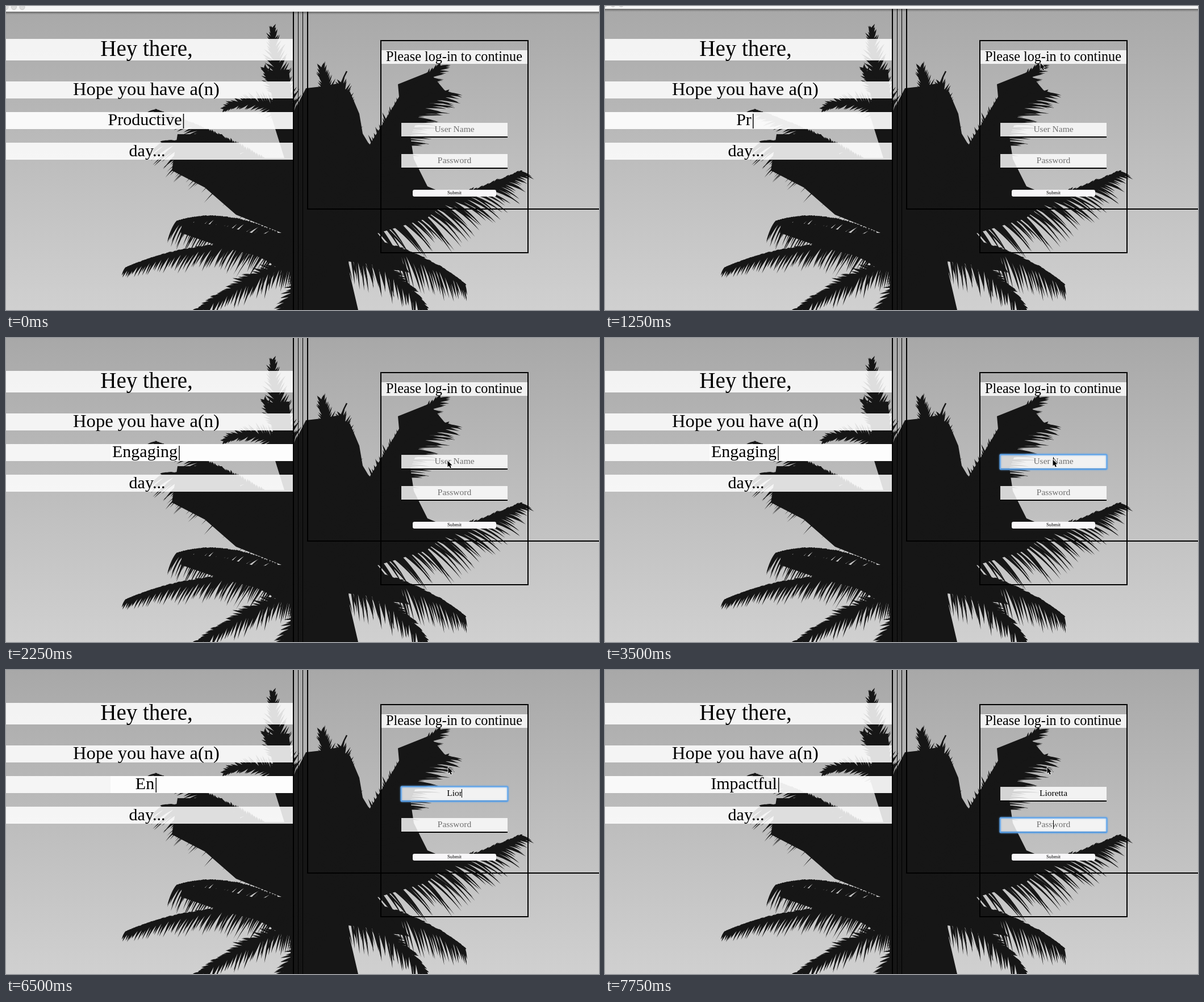
An HTML page with a canvas for the animation above (8000 ms loop, 1044 px wide and 536 px high).

```html
<!DOCTYPE html>
<html lang="en">
<head>
<meta charset="utf-8">
<title>Log-in page</title>
<style>
  html, body { margin: 0; width: 100%; height: 100%; overflow: hidden; background: #bbb; }
  canvas { display: block; }
</style>
</head>
<body>
<canvas id="stage" width="1044" height="536"></canvas>
<script>
const W = 1044, H = 536, LOOP = 8000;
const INK = '#161616';
const ctx = document.getElementById('stage').getContext('2d');

// Each track is a list of [start time, value]; values hold until the next one.
const words = [
  [0, 'Productive'], [1000, 'Produc'], [1250, 'Pr'], [1500, 'En'], [1750, 'Enga'],
  [2000, 'Engaging'], [6250, 'Engag'], [6500, 'En'], [6750, 'I'], [7000, 'Impac'], [7250, 'Impactful']
];
const pointer = [
  [0, null], [1000, [770, 1]], [1250, [766, 100]], [1500, [762, 198]], [1750, [767, 214]],
  [2000, [774, 216]], [2250, [777, 216]], [3000, [784, 216]], [3250, [787, 215]],
  [3500, [788, 214]], [4500, [780, 181]], [4750, [778, 171]]
];
const user = 'Lioretta';
const typed = [[0, 0], [5500, 1], [6000, 2], [6250, 3], [6500, 4], [6750, 5], [7000, 6], [7250, 8]];
const barTop = [[0, 0], [1250, -5], [1500, -20]];
const bright = [[0, W], [1750, 212], [2000, 184], [7500, W]];

function at(track, t) {
  let value = track[0][1];
  for (const [start, v] of track) if (t >= start) value = v;
  return value;
}

function seeded(seed) {
  return () => (seed = (seed * 16807) % 2147483647) / 2147483647;
}

// Spine start, bend, tip; leaflet length on each side; droop.
const fronds = [
  [500, 190, 472, 120, 469, 42, 32, 36, 0],
  [520, 215, 450, 150, 386, 180, 26, 30, 0],
  [515, 215, 480, 160, 456, 112, 26, 30, 0],
  [530, 340, 380, 235, 278, 240, 92, 22, .25],
  [500, 300, 380, 225, 265, 184, 45, 10, .1],
  [530, 430, 400, 350, 302, 380, 74, 10, .55],
  [530, 430, 350, 405, 212, 462, 42, 12, .3],
  [540, 440, 440, 470, 332, 540, 46, 28, .1],
  [570, 400, 585, 240, 556, 112, 38, 48, 0],
  [575, 380, 605, 230, 590, 138, 36, 46, 0],
  [600, 370, 665, 190, 762, 108, 32, 58, .1],
  [600, 370, 670, 190, 775, 152, 26, 84, .1],
  [590, 390, 770, 360, 905, 293, 24, 82, .25],
  [580, 400, 730, 430, 806, 490, 14, 58, .4],
  [580, 425, 680, 450, 740, 536, 24, 50, .2],
  [560, 430, 520, 490, 470, 560, 40, 34, 0]
];

const body = [
  505, 190, 528, 145, 555, 142, 582, 137, 606, 152, 622, 190, 628, 225, 640, 245,
  665, 205, 692, 160, 690, 138, 745, 116, 775, 152, 733, 180, 712, 230, 718, 270,
  742, 318, 785, 336, 740, 375, 650, 402, 690, 440, 710, 470, 640, 455, 600, 450,
  620, 536, 500, 536, 502, 470, 440, 440, 380, 425, 308, 400, 310, 380, 380, 387,
  440, 402, 485, 400, 405, 368, 350, 320, 292, 290, 302, 226, 380, 226, 415, 268,
  490, 268, 462, 178, 470, 165, 458, 115, 498, 112
];

function drawFrond(g, rnd, [x0, y0, cx, cy, x1, y1, lenA, lenB, droop]) {
  const n = Math.round(Math.hypot(x1 - x0, y1 - y0) / 4.5);
  g.lineWidth = 3;
  g.beginPath();
  g.moveTo(x0, y0);
  g.quadraticCurveTo(cx, cy, x1, y1);
  g.stroke();
  g.beginPath();
  for (let i = 1; i <= n; i++) {
    const t = i / n, u = 1 - t;
    const x = u * u * x0 + 2 * u * t * cx + t * t * x1;
    const y = u * u * y0 + 2 * u * t * cy + t * t * y1;
    const dir = Math.atan2(u * (cy - y0) + t * (y1 - cy), u * (cx - x0) + t * (x1 - cx));
    for (const side of [-1, 1]) {
      const len = (side < 0 ? lenA : lenB) * (1 - .65 * t ** 3) * (.7 + .4 * rnd());
      const a = dir + side * (1.05 - .55 * t + .25 * (rnd() - .5));
      const ex = x + len * Math.cos(a), ey = y + len * (Math.sin(a) + droop);
      const mx = x + .55 * len * Math.cos(a), my = y + .55 * len * Math.sin(a);
      const wx = -2.1 * Math.sin(a), wy = 2.1 * Math.cos(a);
      g.moveTo(x - wx, y - wy);
      g.quadraticCurveTo(mx - wx, my - wy, ex, ey);
      g.quadraticCurveTo(mx + wx, my + wy, x + wx, y + wy);
    }
  }
  g.fill();
}

function makeBackdrop() {
  const layer = document.createElement('canvas');
  layer.width = W;
  layer.height = H;
  const g = layer.getContext('2d');
  const sky = g.createLinearGradient(0, 0, 0, H);
  sky.addColorStop(0, '#a8a8a8');
  sky.addColorStop(.5, '#bdbdbd');
  sky.addColorStop(1, '#d0d0d0');
  g.fillStyle = sky;
  g.fillRect(0, 0, W, H);
  g.fillStyle = g.strokeStyle = INK;
  g.beginPath();
  for (let i = 0; i < body.length; i += 2) g.lineTo(body[i], body[i + 1]);
  g.fill();
  const rnd = seeded(4211);
  for (const f of fronds) drawFrond(g, rnd, f);
  // Bare stalk beside the middle frond.
  g.lineWidth = 2.5;
  g.beginPath();
  g.moveTo(588, 142);
  g.lineTo(595, 125);
  g.lineTo(600, 115);
  g.stroke();
  return layer;
}
const backdrop = makeBackdrop();

function rect(x, y, w, h, color) {
  ctx.fillStyle = color;
  ctx.fillRect(x, y, w, h);
}

function text(str, x, y, size, color = '#000') {
  ctx.font = `${size}px "Liberation Serif", serif`;
  ctx.textAlign = 'center';
  ctx.fillStyle = color;
  ctx.fillText(str, x, y);
}

function drawGreeting(t) {
  const veil = 'rgba(255,255,255,.86)';
  rect(0, 58, 505, 38, veil);
  for (const y of [133, 187, 241]) rect(0, y, 505, 30, veil);
  const x = at(bright, t);
  if (x < 505) rect(x, 187, 505 - x, 30, '#fdfdfd');
  else rect(0, 187, 505, 30, 'rgba(255,255,255,.4)');
  text('Hey there,', 247.5, 88, 39);
  text('Hope you have a(n)', 247, 157, 32.6);
  text(at(words, t) + '|', 247.5, 210, 30);
  text('day...', 248.5, 265, 30);
}

function drawLines() {
  rect(505, 0, 2, H, '#000');
  rect(514, 0, 1, H, '#000');
  rect(522, 0, 1, H, '#000');
  rect(530, 0, 2, 359, '#000');
  rect(530, 357, W - 530, 2, '#000');
  ctx.strokeStyle = '#000';
  ctx.lineWidth = 2;
  ctx.strokeRect(660, 61, 259, 374);
}

function drawField(y, label, value, focused, caret) {
  rect(696, y, 187, 24, 'rgba(255,255,255,.82)');
  rect(696, y + 24, 187, 2, focused ? '#1c4f86' : '#000');
  if (focused) {
    ctx.save();
    ctx.strokeStyle = '#5ea3ea';
    ctx.lineWidth = 2;
    ctx.shadowColor = '#5ea3ea';
    ctx.shadowBlur = 3;
    ctx.beginPath();
    ctx.roundRect(695.5, y - .5, 188, 26, 1.5);
    ctx.stroke();
    ctx.restore();
  }
  text(value || label, 789.5, y + 16, 15.5, value ? '#000' : '#707070');
  if (caret) {
    const half = value ? ctx.measureText(value).width / 2 : 0;
    rect(Math.round(789 + half), y + 4, 1, 15, '#000');
  }
}

function drawForm(t) {
  rect(661, 78, 257, 24, 'rgba(255,255,255,.84)');
  text('Please log-in to continue', 789, 97, 24.2);
  const name = user.slice(0, at(typed, t));
  const onUser = t >= 3500 && t < 7750, onPass = t >= 7750;
  const blink = Math.floor((t - 3500) / 500) % 2 === 0;
  drawField(206, 'User Name', name, onUser, onUser && (t >= 5500 || blink));
  drawField(261, 'Password', '', onPass, onPass);
  ctx.fillStyle = '#f8f7f9';
  ctx.beginPath();
  ctx.roundRect(716, 324, 147, 12, 3);
  ctx.fill();
  text('Submit', 789.5, 332, 8.6);
}

function drawBar(top) {
  if (top < -10) return;
  rect(0, top, W, 10, '#f5f5f5');
  const shade = ctx.createLinearGradient(0, top + 10, 0, top + 15);
  shade.addColorStop(0, 'rgba(0,0,0,.4)');
  shade.addColorStop(1, 'rgba(0,0,0,0)');
  rect(0, top + 10, W, 5, shade);
  ctx.fillStyle = '#dcdcdc';
  ctx.strokeStyle = '#c8c8c8';
  ctx.lineWidth = 1;
  for (const x of [-.5, 14, 28.5]) {
    ctx.beginPath();
    ctx.arc(x, top + 2, 4.5, 0, 2 * Math.PI);
    ctx.fill();
    ctx.stroke();
  }
}

function drawPointer(pos) {
  if (!pos) return;
  ctx.save();
  ctx.translate(pos[0] + .5, pos[1] + .5);
  ctx.beginPath();
  for (const [x, y] of [[0, 0], [0, 11], [2.5, 8.8], [4.4, 13], [6.4, 12.1], [4.6, 8], [8, 8]]) ctx.lineTo(x, y);
  ctx.closePath();
  ctx.lineJoin = 'round';
  ctx.lineWidth = 1.6;
  ctx.strokeStyle = '#fff';
  ctx.stroke();
  ctx.fillStyle = '#000';
  ctx.fill();
  ctx.restore();
}

function draw(t) {
  ctx.drawImage(backdrop, 0, 0);
  drawGreeting(t);
  drawLines();
  drawForm(t);
  drawBar(at(barTop, t));
  drawPointer(at(pointer, t));
}

const start = performance.now();
function tick() {
  draw((performance.now() - start) % LOOP);
  requestAnimationFrame(tick);
}
tick();
</script>
</body>
</html>
```
